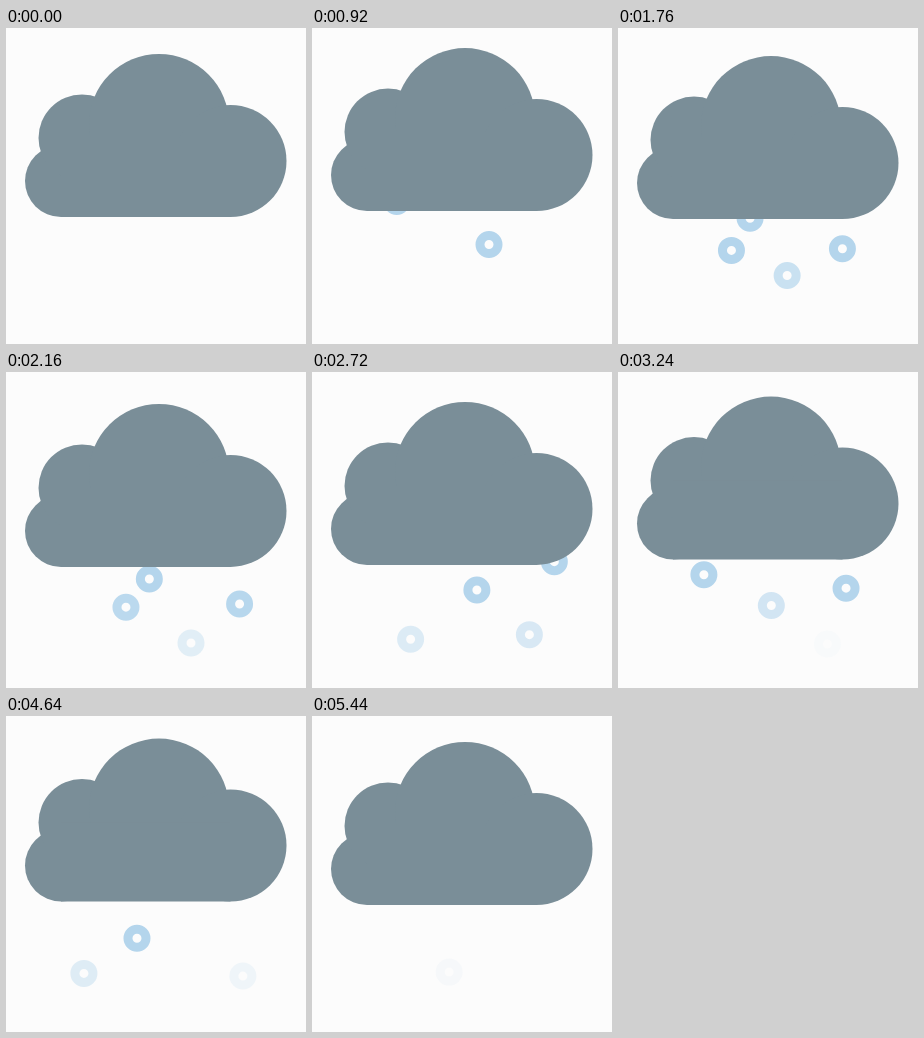
These frames come from a looping animation (300 by 316 pixels, 5800 ms). An HTML page:

```html
<!DOCTYPE html>
<html lang="en">
<head>
<meta charset="utf-8">
<title>Snow cloud</title>
<style>
  html, body { margin: 0; width: 100%; height: 100%; overflow: hidden; background: #fcfcfc; }
  svg { display: block; width: 100vw; height: 100vh; }
</style>
</head>
<body>
<svg viewBox="0 0 300 316">
  <g id="snow" fill="none" stroke="#b4d5ec" stroke-width="9"></g>
  <g id="cloud" fill="#7a8e98">
    <circle cx="55" cy="153" r="36"/>
    <circle cx="76" cy="110" r="43.5"/>
    <circle cx="153" cy="96" r="70"/>
    <circle cx="224.5" cy="133" r="56"/>
    <path d="M55 189V110H224.5V189Z"/>
  </g>
</svg>
<script>
const LOOP = 5800, STEP = 40, START = 120, END = 5440;
const cloud = document.getElementById('cloud');
const snow = document.getElementById('snow');

// Vertical bob of the cloud: [time, offset]
const bob = [[80, 0], [1000, -6], [2240, 6], [3980, -6], [END, 0]];

// Shared falling path: [age, sideways swing, height]
const path = [
  [200, 0, 168], [680, 2.5, 201], [920, 18, 216.5], [1400, 33, 230],
  [1880, 22, 254], [2160, 10, 271], [2480, 8, 272]
];

const flakes = [
  { lag: 0, x: 195, swing: -1 },
  { lag: 640, x: 84.5, swing: 1.1 },
  { lag: 710, x: 201.6, swing: 0.97 },
  { lag: 1340, x: 132, swing: 1, drop: 0.6 },
  { lag: 2240, x: 242.4, swing: -0.67, drop: 0.83 },
  { lag: 2530, x: 89.5, swing: -1, drop: 0.83 },
  { lag: 3310, x: 175.5, swing: -1, drop: 0.8, drift: -27.5, gone: 2200 }
];

for (const f of flakes) {
  f.el = document.createElementNS('http://www.w3.org/2000/svg', 'circle');
  f.el.setAttribute('r', 9);
  snow.appendChild(f.el);
}

const clamp = v => Math.max(0, Math.min(1, v));

function bobAt(t) {
  let y = bob[0][1];
  for (let i = 1; i < bob.length; i++) {
    const [t0, y0] = bob[i - 1], [t1, y1] = bob[i];
    if (t >= t0) y = y0 + (y1 - y0) * (1 - Math.cos(Math.PI * clamp((t - t0) / (t1 - t0)))) / 2;
  }
  return y;
}

function slope(i, c) {
  const a = path[Math.max(0, i - 1)], b = path[Math.min(path.length - 1, i + 1)];
  return (b[c] - a[c]) / (b[0] - a[0]);
}

// Cubic Hermite through the path points
function along(age, c) {
  const last = path.length - 1;
  if (age >= path[last][0]) return path[last][c];
  let i = 0;
  while (age >= path[i + 1][0]) i++;
  const a = path[i], b = path[i + 1], d = b[0] - a[0], u = (age - a[0]) / d, v = 1 - u;
  return v * v * (1 + 2 * u) * a[c] + u * u * (3 - 2 * u) * b[c]
    + d * u * v * (v * slope(i, c) - u * slope(i + 1, c));
}

function drawFlake(f, t) {
  const { lag, x, swing, drop = 1, drift = 0, gone = 2600, el } = f;
  const age = t - lag;
  if (age < path[0][0] || age >= gone) {
    el.setAttribute('opacity', 0);
    return;
  }
  el.setAttribute('cx', x + swing * along(age, 1) + drift * clamp((age - 690) / 1440));
  el.setAttribute('cy', 201 + drop * (along(age, 2) - 201));
  el.setAttribute('opacity', clamp((gone - age) / (gone - 1400)));
}

function draw(now) {
  let t = Math.min(Math.floor((now % LOOP) / STEP) * STEP, END);
  if (t < START) t = 0;
  cloud.setAttribute('transform', `translate(0 ${bobAt(t)})`);
  for (const f of flakes) drawFlake(f, t);
}

const origin = performance.now();
function tick() {
  draw(performance.now() - origin);
  requestAnimationFrame(tick);
}
tick();
</script>
</body>
</html>
```
